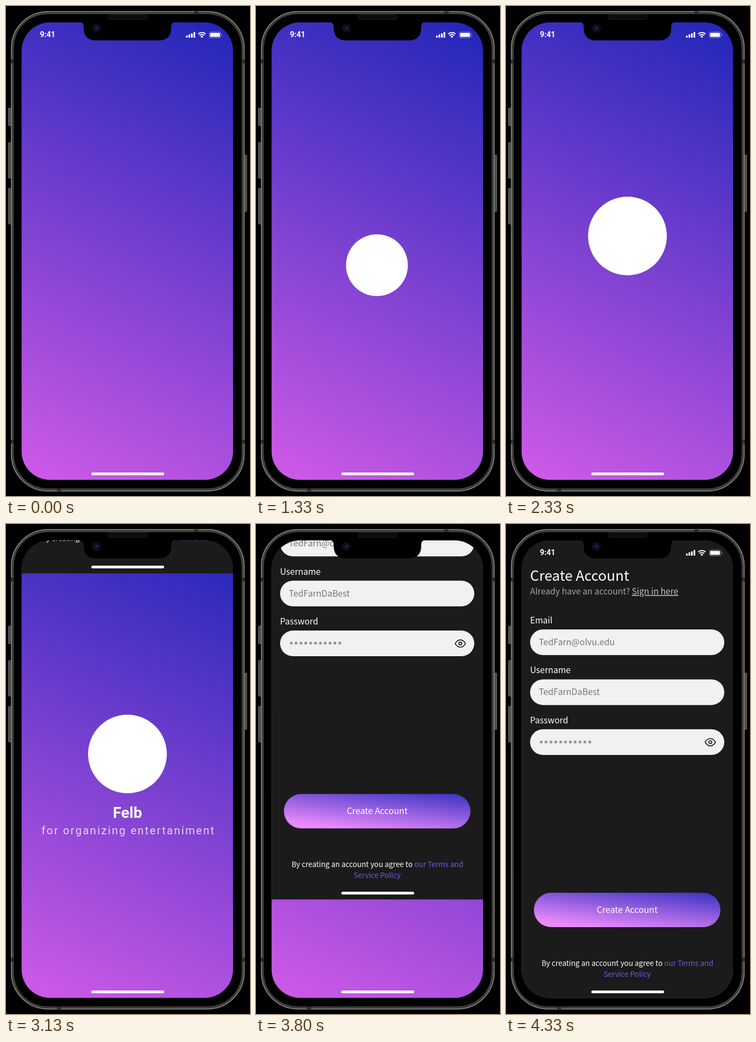
Write an HTML page that moves like this. It is 446 px wide and 897 px high and loops after 5.2 s.

```html
<!DOCTYPE html>
<html lang="en">
<head>
<meta charset="utf-8">
<title>Sign-up flow</title>
<style>
  html, body { margin: 0; width: 100%; height: 100%; overflow: hidden; background: #000; }
  svg { display: block; width: 100vw; height: 100vh; }
  .form text { font-family: "Noto Sans CJK JP", "Noto Sans CJK SC", "Noto Sans CJK KR", "Noto Sans CJK", sans-serif; font-size: 15.5px; fill: #fff; }
  .form .hint { font-size: 15.8px; fill: #777; }
  .form .title { font-size: 25.8px; font-weight: 500; }
  .form .terms { font-size: 13.4px; }
  .form .link { fill: #6f5ae6; }
  .roboto, .form .roboto { font-family: Roboto, sans-serif; fill: #fff; }
  .clock, .form .clock { font-size: 14px; font-weight: 600; }
</style>
</head>
<body>
<svg viewBox="0 0 446 897" preserveAspectRatio="none">
  <defs>
    <linearGradient id="sky" gradientUnits="userSpaceOnUse" x1="416" y1="30" x2="8" y2="856">
      <stop stop-color="#2026b8"/><stop offset="1" stop-color="#d05ae8"/>
    </linearGradient>
    <linearGradient id="cta" x1="1" y1="0" x2=".36" y2="1.03">
      <stop stop-color="#3731c2"/><stop offset="1" stop-color="#ea8afb"/>
    </linearGradient>
    <clipPath id="screen"><rect x="28.5" y="30" width="386.5" height="837.5" rx="52"/></clipPath>
    <g id="chrome">
      <text class="roboto clock" x="62" y="57">9:41</text>
      <g fill="#fff">
        <rect x="329" y="54" width="3" height="4" rx=".8"/>
        <rect x="333.6" y="52" width="3" height="6" rx=".8"/>
        <rect x="338.2" y="50" width="3" height="8" rx=".8"/>
        <rect x="342.8" y="47.5" width="3" height="10.5" rx=".8"/>
        <path d="M358 58.4l-2.4-2.5a3.6 3.6 0 0 1 4.8 0z"/>
        <rect x="373" y="49.2" width="18" height="7.4" rx="1.4"/>
        <path d="M394 51v4q1.4-.6 1.4-2t-1.4-2" opacity=".45"/>
        <rect x="156" y="854" width="133" height="5" rx="2.5"/>
      </g>
      <g fill="none" stroke="#fff">
        <path d="M351.3 51.3a9.6 9.6 0 0 1 13.4 0M353.7 54a6.2 6.2 0 0 1 8.6 0" stroke-width="2"/>
        <rect x="371.5" y="47.6" width="21.3" height="10.6" rx="3" opacity=".45"/>
      </g>
    </g>
  </defs>

  <rect width="446" height="897"/>

  <!-- phone body -->
  <g fill="#4a4a46" stroke="#85847c" stroke-width=".8">
    <rect x="4.5" y="187" width="5" height="32" rx="1"/>
    <rect x="4.5" y="250" width="5" height="65" rx="1"/>
    <rect x="4.5" y="334" width="5" height="65" rx="1"/>
    <rect x="435.5" y="273" width="4.5" height="103" rx="1"/>
  </g>
  <rect x="11.5" y="12" width="422" height="874" rx="65" stroke="#3b3b39" stroke-width="5"/>
  <g fill="none">
    <rect x="9.8" y="10.2" width="425.6" height="877.6" rx="67" stroke="#8b8a84" stroke-width="1.5"/>
    <rect x="13.6" y="14.2" width="417.8" height="869.6" rx="63" stroke="#50504c" stroke-width=".9"/>
  </g>
  <g fill="#2b2b2a">
    <path d="M344 10h8v5h-8zM93 883h8v5h-8zM9 98h5v7h-5zM431 98h5v7h-5zM9 794h5v7h-5zM431 794h5v7h-5z"/>
  </g>
  <rect x="187" y="16" width="71" height="8.5" rx="3" fill="#0b0b0b" stroke="#222"/>

  <g clip-path="url(#screen)">
    <rect x="28" y="30" width="388" height="838" fill="url(#sky)"/>
    <use href="#chrome"/>
    <circle id="mark" fill="#fff"/>
    <g id="slogan" class="roboto">
      <text x="222" y="538" text-anchor="middle" font-size="28" font-weight="600">Felb</text>
      <text x="65" y="568" font-size="20" letter-spacing="2.3" opacity=".78">for organizing entertaniment</text>
    </g>
    <g id="form" class="form">
      <rect x="28" y="30" width="388" height="838" fill="#1b1b1b"/>
      <use href="#chrome"/>
      <text class="title" x="44" y="104">Create Account</text>
      <text x="44" y="129" style="fill:#a6a6a6">Already have an account? <tspan fill="#c4c4c4" text-decoration="underline">Sign in here</tspan></text>
      <g id="fields"></g>
      <g fill="none" stroke="#161616" stroke-width="1.6">
        <path d="M364 399.5Q368 392.8 373.5 392.8T383 399.5Q379 406.2 373.5 406.2T364 399.5z" stroke-linejoin="round"/>
        <circle cx="373.5" cy="399.5" r="2.7"/>
      </g>
      <rect x="51" y="675" width="341" height="63" rx="31.5" fill="url(#cta)"/>
      <g text-anchor="middle">
        <text x="221.5" y="712" style="font-size:15.9px">Create Account</text>
        <text class="terms" x="222" y="809">By creating an account you agree to <tspan class="link">our Terms and</tspan></text>
        <text class="terms link" x="221.5" y="829">Service Policy</text>
      </g>
    </g>
  </g>

  <!-- notch and camera -->
  <path d="M134 29.5q8 0 8 8v2.5q0 23 23 23h114q23 0 23-23v-2.5q0-8 8-8z"/>
  <circle cx="165" cy="41" r="8.5" fill="#0e0e10"/>
  <circle cx="165" cy="41" r="4.8" fill="#11112c"/>
  <circle cx="166" cy="40.5" r="2" fill="#2b2468"/>
</svg>
<script>
  const LOOP = 5200, STEP = 1000 / 15;
  const byId = id => document.getElementById(id);
  const mark = byId('mark'), slogan = byId('slogan'), form = byId('form');

  const fields = [['Email', 'TedFarn@olvu.edu'], ['Username', 'TedFarnDaBest'], ['Password', '*'.repeat(11)]];
  byId('fields').innerHTML = fields.map(([label, hint], i) => {
    const y = 193 + i * 91.4, secret = i === 2;
    return `<text x="44" y="${y - 11}">${label}</text>
      <rect x="44" y="${y}" width="355" height="47" rx="23.5" fill="#f1f1f1"/>
      <text class="hint" x="60" y="${y + (secret ? 35 : 29)}"${secret ? ' style="font-size:19px"' : ''}>${hint}</text>`;
  }).join('');

  const progress = (t, start, length) => Math.min(1, Math.max(0, (t - start) / length));

  // cubic-bezier(0, 0, .58, 1)
  function easeOut(x) {
    let low = 0, high = 1;
    for (let i = 0; i < 24; i++) {
      const u = (low + high) / 2;
      if (1.74 * u * u - 0.74 * u ** 3 < x) low = u; else high = u;
    }
    return 3 * low * low - 2 * low ** 3;
  }

  function draw(time) {
    // the picture advances in 15 steps a second
    const t = Math.floor((time % LOOP + 7) / STEP) * STEP;

    const left = (1 - progress(t, 900, 1430)) ** 4;
    mark.setAttribute('cx', 222 - 4 * left);
    mark.setAttribute('cy', 421 + 227 * left);
    mark.setAttribute('r', t < 920 ? 0 : 72 * (1 - 0.91 * left));

    slogan.setAttribute('opacity', easeOut(progress(t, 2490, 240)));

    const slide = easeOut(progress(t, 3081, 1200));
    form.setAttribute('transform', `translate(0 ${(-838 * (1 - slide)).toFixed(2)})`);
  }

  const begin = performance.now();
  function tick() {
    draw(performance.now() - begin);
    requestAnimationFrame(tick);
  }
  tick();
</script>
</body>
</html>
```
